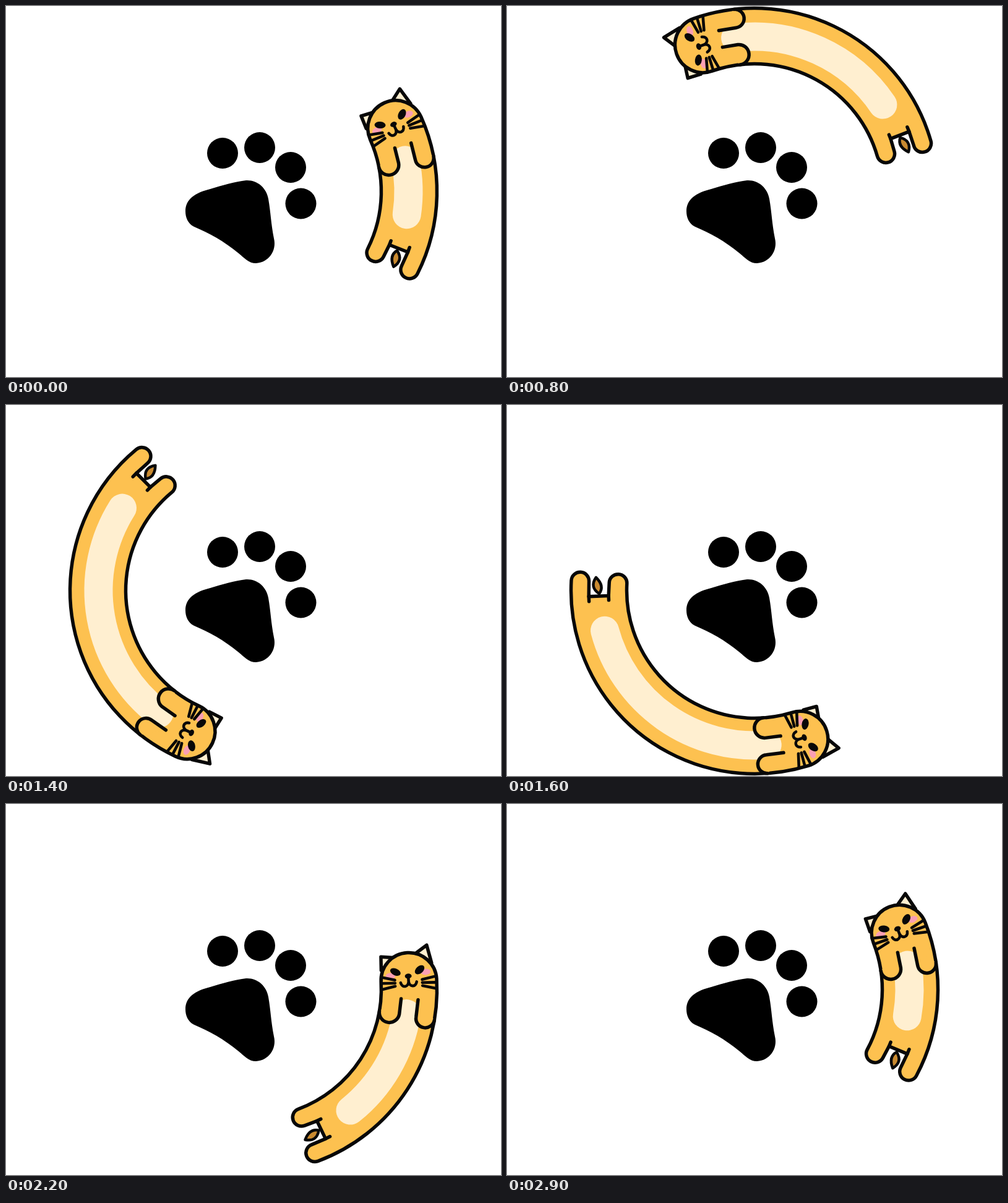
Write an HTML page with a canvas that moves like this. It is 800x600 px and loops after 3000 ms.

```html
<!DOCTYPE html>
<html lang="en">
<head>
<meta charset="utf-8">
<title>Stretchy cat</title>
<style>
  html, body { margin: 0; width: 100%; height: 100%; overflow: hidden; background: #fff; }
  canvas { display: block; }
</style>
</head>
<body>
<canvas id="stage" width="800" height="600"></canvas>
<script>
const g = document.getElementById('stage').getContext('2d');
const LOOP = 3000, STEP = 100, DEG = Math.PI / 180;
const INNER = 206.5, MIDDLE = 251.5, OUTER = 296.5, LINE = 5.5;
const INK = '#080808', FUR = '#fdc150', CREAM = '#ffefd0', PINK = '#fa9fb4';

// Counter-clockwise angles of both ends: the middle circles with eased speed
// while the length swells and shrinks once per loop.
function pose(t) {
  const p = 2 * Math.PI * (t + 150) / LOOP;
  const middle = p / DEG - 4 - 50.7 * Math.sin(p) + Math.sin(2 * p);
  const half = 40.7 - 16.5 * Math.cos(p) + 0.7 * Math.cos(2 * p);
  return { head: middle + half, tail: middle - half };
}

const polar = (r, deg) => [r * Math.cos(deg * DEG), -r * Math.sin(deg * DEG)];

function paint(fill, width) {
  if (fill) { g.fillStyle = fill; g.fill(); }
  if (width) { g.lineWidth = width; g.strokeStyle = INK; g.stroke(); }
}

function polyline(...points) {
  points.forEach(([x, y], i) => i ? g.lineTo(x, y) : g.moveTo(x, y));
}

function oval(x, y, rx, ry, tilt, fill) {
  g.beginPath();
  g.ellipse(x, y, rx, ry, tilt * DEG, 0, 7);
  paint(fill);
}

const pad = new Path2D(`M330 296C350 290 370 284 388 282C406 281 421 294 424 312
  C428 335 428 350 433 376C438 396 424 415 404 416C392 416 386 408 376 400
  C350 379 330 368 304 357C294 352 290 342 290 332C290 312 306 302 330 296Z`);

function drawPaw() {
  for (const [x, y] of [[350, 238], [410, 229], [460, 261], [476.5, 319.5]]) oval(x, y, 25, 25, 0, '#000');
  g.fillStyle = '#000';
  g.fill(pad);
}

// Runs fn with the origin on the head and its top pointing up.
function onHead(head, fn) {
  g.save();
  g.rotate(-head * DEG);
  g.translate(251, 0);
  fn();
  g.restore();
}

function drawEar(...corners) {
  g.beginPath();
  polyline(...corners);
  g.closePath();
  paint(CREAM, LINE);
}

function drawEars() {
  drawEar([-43, -17], [-42, -39], [-19, -36]);
  drawEar([13, -40], [33, -53], [39, -24]);
}

function drawBody(head, tail) {
  const h = -(head - 0.5) * DEG, t = -tail * DEG, crotch = tail + 5.2;
  g.beginPath();
  g.arc(...polar(MIDDLE, head - 0.5), 45, Math.PI + h, 2 * Math.PI + h);
  g.arc(0, 0, OUTER, h, t);
  g.arc(...polar(282.2, tail), 14.3, t, Math.PI + t);
  g.lineTo(...polar(268, crotch));
  g.lineTo(...polar(236, crotch));
  g.arc(...polar(220.8, tail), 14.3, t, Math.PI + t);
  g.arc(0, 0, INNER, t, h, true);
  g.closePath();
  paint(FUR, LINE);

  g.beginPath();
  for (const r of [236, 268]) polyline(polar(r, crotch), polar(r, crotch + 1.7));
  paint(null, LINE);

  g.beginPath();
  g.arc(0, 0, 250.5, -(head - 12.8) * DEG, -(tail + 18.1) * DEG);
  g.lineWidth = 46;
  g.strokeStyle = CREAM;
  g.stroke();
}

function drawTail(tail) {
  g.beginPath();
  g.moveTo(...polar(251, tail + 4.3));
  g.quadraticCurveTo(...polar(242, tail + 1.4), ...polar(257, tail - 1.6));
  g.quadraticCurveTo(...polar(267, tail + 2), ...polar(251, tail + 4.3));
  paint('#c98a30', 4.5);
}

function drawArm(edge, centre, head) {
  const wrist = head - 13.4, turn = -wrist * DEG, inward = centre < edge;
  const from = inward ? turn : Math.PI + turn;
  g.beginPath();
  polyline(polar(edge, head - 7.4), polar(edge, wrist));
  g.arc(...polar(centre, wrist), Math.abs(edge - centre), from, from + (inward ? 1 : -1) * Math.PI, !inward);
  paint(FUR, LINE);
}

function drawFace() {
  oval(-28.5, -7, 8, 5, 0, PINK);
  oval(28.5, -10, 8, 5, 0, PINK);
  oval(-20.3, -13, 9, 5.5, 28, INK);
  oval(19, -14, 9, 5.8, -38, INK);
  oval(0, -5, 5.5, 4, 0, INK);
  g.beginPath();
  g.moveTo(-13, 5);
  g.bezierCurveTo(-11, 14, -1, 13, 0, 4);
  g.bezierCurveTo(1, 13, 11, 14, 13, 5);
  polyline([0, -5], [0, 5]);
  for (const side of [-1, 1]) {
    for (const row of [-1, 0, 1]) {
      polyline([side * 22, 6 + side + row * 5], [side * 44, 6 + side * 2 + row * 10]);
    }
  }
  paint(null, 4.6);
}

function draw(t) {
  const { head, tail } = pose(t);
  g.fillStyle = '#fff';
  g.fillRect(0, 0, 800, 600);
  drawPaw();
  g.save();
  g.translate(400, 300);
  g.lineCap = g.lineJoin = 'round';
  onHead(head, drawEars);
  drawBody(head, tail);
  drawTail(tail);
  drawArm(239, 222.7, head);
  drawArm(266.5, 281.5, head);
  onHead(head, drawFace);
  g.restore();
}

const start = performance.now();
function tick() {
  const t = (performance.now() - start) % LOOP;
  draw(Math.floor(t / STEP) * STEP);
  requestAnimationFrame(tick);
}
tick();
</script>
</body>
</html>
```
